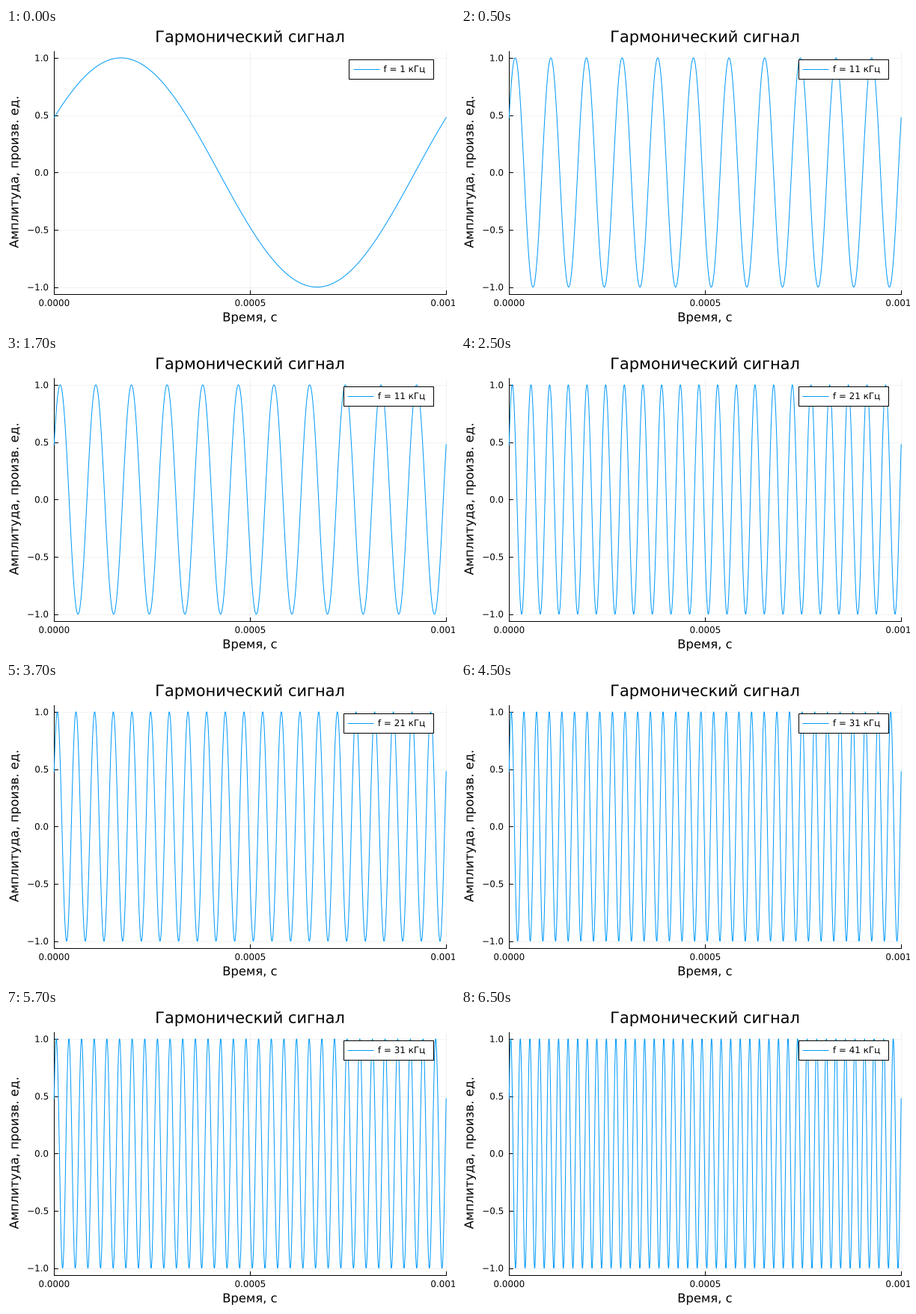
Animation of 600x400 px, one loop 8000 ms. Source, as a matplotlib script:

```python
import matplotlib.pyplot as plt
import numpy as np
from matplotlib.animation import FuncAnimation
from matplotlib.patches import PathPatch, Rectangle
from matplotlib.textpath import TextPath
from matplotlib.transforms import Affine2D

plt.rcParams.update({"font.family": "DejaVu Sans", "path.simplify": False})

W, H, DPI = 600, 400, 100
PX = 72 / DPI  # points per pixel
LEFT, RIGHT, TOP, BOTTOM = 64.3, 588.2, 30.8, 355.8
MIDDLE = (TOP + BOTTOM) / 2
UNIT = (BOTTOM - TOP) / 2.12  # pixels per unit of amplitude
SMALL, MEDIUM, LARGE = 11.93, 16.4, 20.9
BLUE = "#009afa"
FREQUENCIES = [1, 11, 21, 31, 41]  # kHz
PHASE = 0.5
INTERVAL = 500

fig = plt.figure(figsize=(W / DPI, H / DPI), dpi=DPI, facecolor="white")
ax = fig.add_axes([0, 0, 1, 1])
ax.set_xlim(0, W)
ax.set_ylim(H, 0)
ax.axis("off")


def text_path(text, x, baseline, size, align=0.5, angle=0):
    """Outline of a label; align 0, 0.5 or 1 puts its left, middle or right at x."""
    path = TextPath((0, 0), text, size=size)
    box = path.get_extents()
    shift = Affine2D().translate(-box.x0 - align * box.width, 0)
    return shift.scale(1, -1).rotate_deg(angle).translate(x, baseline).transform_path(path)


def add_text(*args, zorder=2, **kwargs):
    patch = PathPatch(text_path(*args, **kwargs), fc="black", lw=0, zorder=zorder)
    return ax.add_patch(patch)


def add_line(xs, ys, color="black", width=1.0, **kwargs):
    return ax.plot(xs, ys, color=color, lw=width * PX, **kwargs)[0]


def add_axes():
    for i, label in enumerate(["0.0000", "0.0005", "0.0010"]):
        x = LEFT + i * (RIGHT - LEFT) / 2
        add_line([x, x], [TOP, BOTTOM], width=0.5, alpha=0.1, zorder=1)
        add_line([x, x], [BOTTOM, BOTTOM - 5], zorder=2)
        add_text(label, x, 371.9, SMALL)
    for value in np.arange(-1, 1.1, 0.5):
        y = MIDDLE - value * UNIT
        add_line([LEFT, RIGHT], [y, y], width=0.5, alpha=0.1, zorder=1)
        add_line([LEFT, LEFT + 5], [y, y], zorder=2)
        add_text(f"{value:.1f}".replace("-", "\u2212"), 56.2, y + 4.35, SMALL, align=1)
    add_line([LEFT, LEFT, RIGHT], [TOP, BOTTOM, BOTTOM], zorder=2)


add_axes()
add_text("Гармонический сигнал", 326.2, 18.8, LARGE)
add_text("Время, с", 326.2, 392.4, MEDIUM)
add_text("Амплитуда, произв. ед.", 16.5, MIDDLE, MEDIUM, angle=-90)

time = np.linspace(0, 1, 6001)  # ms
curve = add_line(LEFT + time * (RIGHT - LEFT), 0 * time, BLUE, zorder=3)
legend_box = ax.add_patch(Rectangle((0, 41.5), 1, 26, fc="white", ec="black",
                                    lw=PX, zorder=4))
legend_line = add_line([0, 0], [54.5, 54.5], BLUE, zorder=5, solid_capstyle="butt")
legend_text = add_text("f", 0, 59, SMALL, zorder=5)


def update(frame):
    # The first frequency is already at the end of its two-second hold.
    freq = FREQUENCIES[(frame + 3) // 4]
    curve.set_ydata(MIDDLE - UNIT * np.sin(2 * np.pi * freq * time + PHASE))
    label = text_path(f"f = {freq} кГц", 559.7, 59, SMALL, align=1)
    legend_text.set_path(label)
    start = label.get_extents().x0
    legend_box.set_x(start - 46.6)
    legend_box.set_width(570.6 - legend_box.get_x())
    legend_line.set_xdata([start - 41, start - 6])
    return curve, legend_box, legend_line, legend_text


anim = FuncAnimation(fig, update, frames=16, interval=INTERVAL,
                     init_func=lambda: update(0), repeat=True, repeat_delay=0)
plt.show()
```
